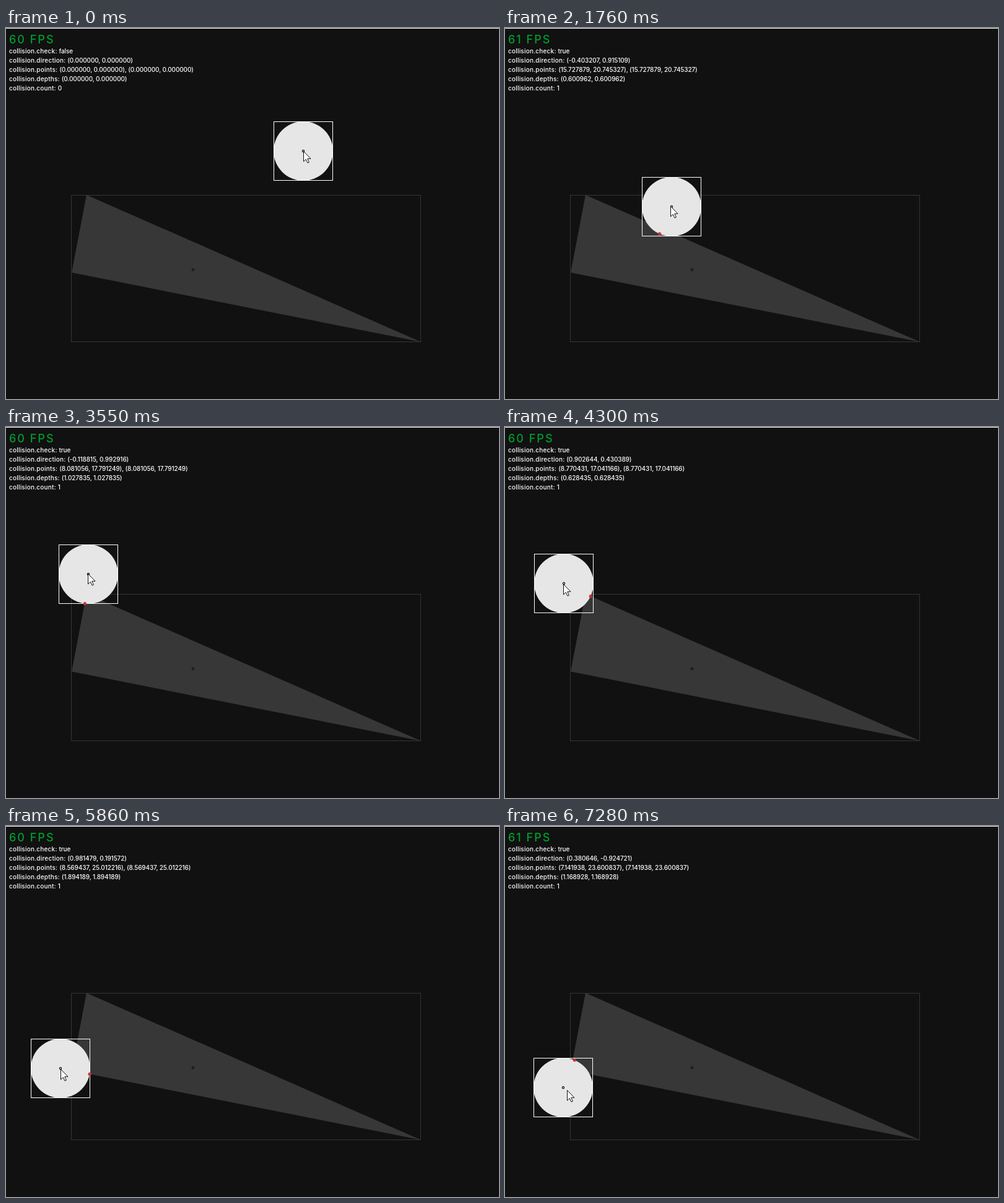
An HTML page for the animation above (7.38 s loop, 796 px wide and 600 px high).

```html
<!DOCTYPE html>
<html lang="en">
<head>
<meta charset="utf-8">
<title>Circle and polygon collision</title>
<style>
  html, body { margin: 0; width: 100%; height: 100%; overflow: hidden; background: #111; }
  svg { display: block; width: 796px; height: 600px; }
  text { font-family: Inter, "DejaVu Sans", sans-serif; font-weight: 500; white-space: pre; }
  #fps { font-size: 18px; letter-spacing: 2px; fill: #009e2f; }
  .label { font-size: 10px; letter-spacing: .2px; fill: #fff; }
  .value { letter-spacing: -.12px; }
  .box { fill: none; shape-rendering: crispEdges; }
  .center { fill: none; stroke: #111; stroke-width: 1.2; }
</style>
</head>
<body>
<svg id="stage" viewBox="0 0 796 600">
  <rect width="796" height="600" fill="#111"/>
  <rect width="796" height="1" fill="#fff"/>
  <path d="M130 270L106 395.5L669.5 507.5Z" fill="#373737"/>
  <rect class="box" x="105.5" y="270.5" width="564" height="237" stroke="#353535"/>
  <circle class="center" cx="302" cy="391" r="1.6"/>
  <g id="ball">
    <circle r="48" fill="#e6e6e6"/>
    <rect class="box" x="-47.5" y="-47.5" width="95" height="95" stroke="#fff"/>
    <circle class="center" r="1.6"/>
  </g>
  <circle id="contact" r="2.6" fill="#c8323e"/>
  <path id="cursor" d="M.5 .5V17L4.3 13.4L7 19.2L9.4 18.1L6.8 12.3H12Z" fill="#fff" stroke="#111"/>
  <text id="fps" x="5" y="25"></text>
</svg>
<script>
const LOOP = 7380, LAST_CHANGE = 7280, TICK = 20, CURSOR_LEAD = 24;
const UNIT = 16, RADIUS = 3, OFFSET = { x: -2, y: 1 };

// time, x, y of the ball centre on the stage
const PATH = [
  [0, 480, 199], [100, 480, 199], [780, 369, 301], [840, 358, 303],
  [1200, 312, 304], [1580, 280, 298], [1760, 269, 289], [2320, 213, 268],
  [2780, 174, 254], [3060, 160, 246], [3800, 119, 236], [4300, 95, 253],
  [4560, 89, 268], [5300, 85, 376], [5860, 88, 392], [6060, 86, 398],
  [6300, 84, 407], [6640, 86, 414], [6900, 86, 414], [7280, 94, 423],
  [7304, 100, 427], [7380, 112, 436]
];
const FAST_SPANS = [[1400, 2000], [2460, 2660], [5100, 5600], [7100, LOOP]];

// polygon faces and the two corners the ball passes, in world units
const TOP = { x: -0.403207, y: 0.915109, offset: 12.041681 };
const LEFT = { x: 0.981479, y: 0.191572, offset: 11.308171 };
const UPPER = { x: 8.203178, y: 16.770695 };
const LOWER = { x: 6.69699, y: 24.68177 };

const byId = id => document.getElementById(id);
const dot = (a, b) => a.x * b.x + a.y * b.y;
const minus = (a, b) => ({ x: a.x - b.x, y: a.y - b.y });

function addLine(name, row) {
  const svgNode = tag => document.createElementNS("http://www.w3.org/2000/svg", tag);
  const line = svgNode("text"), value = svgNode("tspan");
  line.setAttribute("class", "label");
  line.setAttribute("x", 5);
  line.setAttribute("y", 41 + row * 15);
  line.textContent = `collision.${name}: `;
  value.setAttribute("class", "value");
  line.append(value);
  byId("stage").append(line);
  return value;
}
const [check, direction, points, depths, count] =
  ["check", "direction", "points", "depths", "count"].map(addLine);

const slope = (i, axis) =>
  (PATH[i + 1][axis] - PATH[i][axis]) / (PATH[i + 1][0] - PATH[i][0]);

// harmonic mean of neighbouring slopes keeps the curve free of overshoot
function tangent(i, axis) {
  if (i === 0) return 0;
  if (i === PATH.length - 1) return slope(i - 1, axis);
  const a = slope(i - 1, axis), b = slope(i, axis);
  return a * b > 0 ? 2 * a * b / (a + b) : 0;
}

function position(t) {
  let i = 0;
  while (i < PATH.length - 2 && t >= PATH[i + 1][0]) i++;
  const span = PATH[i + 1][0] - PATH[i][0];
  const u = (t - PATH[i][0]) / span, v = 1 - u;
  const along = axis => Math.round(
    v * v * (1 + 2 * u) * PATH[i][axis] + u * u * (3 - 2 * u) * PATH[i + 1][axis] +
    span * u * v * (v * tangent(i, axis) - u * tangent(i + 1, axis)));
  return { x: along(1), y: along(2) };
}

function againstFace(center, face) {
  return { normal: face, depth: RADIUS - face.offset + dot(face, center) };
}

function againstCorner(center, corner) {
  const d = minus(corner, center), length = Math.hypot(d.x, d.y);
  return { normal: { x: d.x / length, y: d.y / length }, depth: RADIUS - length };
}

function collide(center) {
  const up = { x: LEFT.y, y: -LEFT.x }, right = { x: TOP.y, y: -TOP.x };
  const beside = center.x < UPPER.x;
  if (beside && dot(minus(center, LOWER), up) < 0) return againstCorner(center, LOWER);
  if (beside && dot(minus(center, UPPER), up) < 0) return againstFace(center, LEFT);
  if (dot(minus(center, UPPER), right) < 0) return againstCorner(center, UPPER);
  return againstFace(center, TOP);
}

const pair = (a, b) => `(${a.toFixed(6)}, ${b.toFixed(6)})`;
const place = (id, p) => byId(id).setAttribute("transform", `translate(${p.x} ${p.y})`);

function draw(time) {
  const t = Math.min(Math.floor(time / TICK) * TICK, LAST_CHANGE);
  const ball = position(t);
  const center = { x: (ball.x - OFFSET.x) / UNIT, y: (ball.y - OFFSET.y) / UNIT };
  const { normal, depth } = collide(center);
  const hit = depth > 0;
  const n = hit ? normal : { x: 0, y: 0 };
  const d = hit ? depth : 0;
  const point = hit
    ? { x: center.x + n.x * RADIUS, y: center.y + n.y * RADIUS }
    : { x: 0, y: 0 };

  place("ball", ball);
  place("cursor", position(t + CURSOR_LEAD));
  place("contact", { x: point.x * UNIT + OFFSET.x, y: point.y * UNIT + OFFSET.y });
  byId("contact").setAttribute("visibility", hit ? "visible" : "hidden");

  const fast = FAST_SPANS.some(([from, to]) => t >= from && t < to);
  byId("fps").textContent = `${fast ? 61 : 60} FPS`;
  check.textContent = hit;
  direction.textContent = pair(n.x, n.y);
  points.textContent = `${pair(point.x, point.y)}, ${pair(point.x, point.y)}`;
  depths.textContent = pair(d, d);
  count.textContent = hit ? 1 : 0;
}

const start = performance.now();
function frame() {
  draw((performance.now() - start) % LOOP);
  requestAnimationFrame(frame);
}
frame();
</script>
</body>
</html>
```
